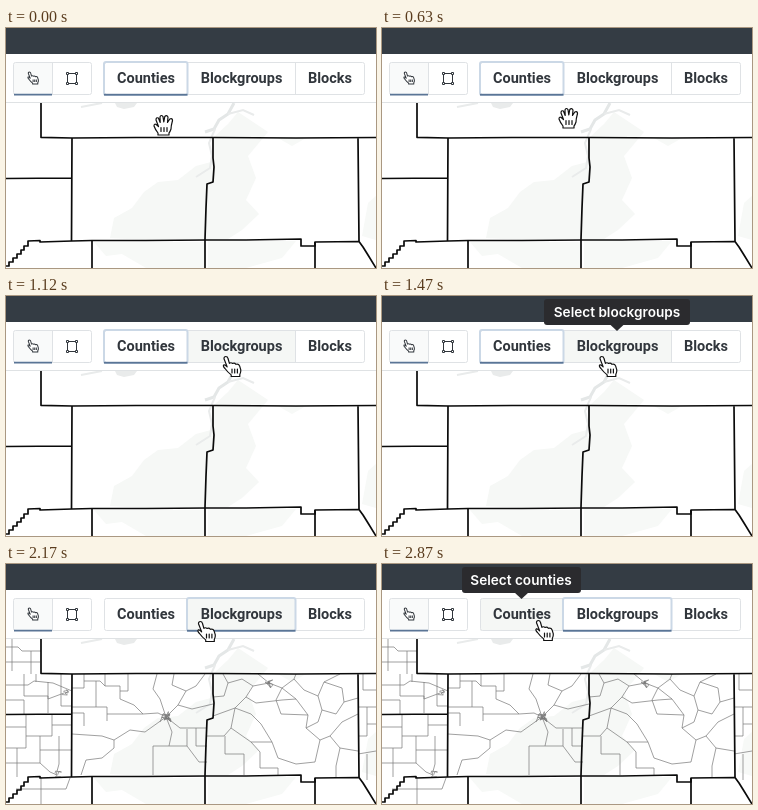
An HTML page for the animation above (2.94 s loop, 370 px wide and 240 px high).

```html
<!DOCTYPE html>
<html lang="en">
<head>
<meta charset="utf-8">
<style>
  html, body { margin: 0; width: 100%; height: 100%; overflow: hidden; background: #fff; }
  svg { display: block; width: 370px; height: 240px; }
  .label { font: 600 14.5px Roboto, sans-serif; fill: #31363c; text-anchor: middle; }
  .tip text { font: 600 13.6px Inter, sans-serif; fill: #fff; text-anchor: middle; }
  .tip { fill: #2b2b2e; }
  .frame { fill: none; stroke: #dfe2e5; }
  .county { fill: none; stroke: #0a0a0a; stroke-width: 1.7; stroke-linejoin: round; }
  .block { fill: none; stroke: #777; stroke-width: .7; stroke-linejoin: round; }
  .cursor { fill: #fff; stroke: #111; stroke-width: 1.2; stroke-linejoin: round; stroke-linecap: round; }
</style>
</head>
<body>
<svg viewBox="0 0 370 240">
  <defs>
    <g id="pointer">
      <path d="M-5 2.2Q-5 0 -3.2 0Q-1.4 0 -1 2L.4 6.8Q2 5.6 3.6 7Q5.4 6 7 7.8Q9.6 7 10.6 9.4L11.8 13.4Q12 16 10.8 18V20H2.2V18.4Q-1.5 15.5 -4 12Q-6.5 9.2 -5.2 8.4Q-4 7.8 -1.8 10.4Z"/>
      <path d="M3 12.5v4M5.7 12.5v4M8.4 12.5v4"/>
    </g>
    <g id="hand">
      <path d="M-6 10V8Q-9 4 -10 1Q-10 -1.5 -7.8 -.5L-5.5 1.5L-8 -5Q-8 -8 -5.6 -7L-3.8 -2.5L-4 -8Q-3 -10.8 -1 -8.3L-.2 -3L.8 -8.5Q2.6 -10.5 4 -8L3.5 -2.5L5.8 -6Q8.5 -7 8.5 -4.5Q7 1 7 4Q6 7 5 8V10Z"/>
      <path d="M-3 2.5v4M0 2.5v4M3 2.5v4"/>
    </g>
  </defs>

  <!-- terrain -->
  <path fill="#f6f8f6" d="M207 110L222 96L232 84L262 104L242 128L250 150L240 172L253 186L236 202L222 211L200 211L140 212L104 210L108 190L126 180L138 164L152 154L172 152L190 138L205 134Z"/>
  <path fill="#f7f9f7" d="M88 214H198V240H140L116 226L100 228ZM202 213H290L276 230L240 240H202ZM272 110L286 118L300 110ZM362 175L370 168V212L356 208Z"/>
  <path fill="#e9ebeb" d="M109 75H131L128 79L118 81L111 79Z"/>
  <path fill="none" stroke="#e4e7e7" stroke-width="3" stroke-linejoin="round" d="M228 75L222 86L213 92L208 101L199 104"/>
  <path fill="none" stroke="#e9ebeb" stroke-width="2" d="M209 101L203 115L206 128L204 140L190 149M222 86L237 82L248 87M75 79L96 75"/>

  <g id="blocks" class="block">
    <path d="M0 83H12L16 87H35M6 75V107M25 87V110M0 98H34M0 121H22L28 117L47 119L66 127M18 110V132H42V149M0 136H18V150M42 118V135L58 129M30 110V118M55 110V142H66"/>
    <path d="M0 163H20V151M20 163V184H0M20 172H46V151M46 161H66M34 172V199H0M34 186H66M53 172V200L50 211M11 184V213M34 199L44 208L51 211M10 225H60L64 214M35 213V240"/>
    <path d="M66 124H78V110M78 117H94L99 122V110M90 117V143H66M99 122H114V135L128 141L137 150L152 149L160 153M114 127H122V110M66 149H78V162M90 143H101V157M101 150L137 150M66 170L96 172L108 176L124 166L139 168L160 153M108 176V184L96 194L80 196L75 211"/>
    <path d="M160 153L154 135L147 125L151 110M160 153L172 141L180 127L190 122L199 110M172 141L186 145L207 140M180 127L166 121L168 110M160 153L174 164H201M160 153L166 168L163 182H147V211M163 182H181L193 198H201M181 182V165M190 164V182H201"/>
    <path d="M207 133L218 132L222 119L217 110M222 119L236 115L247 122L263 119L252 110M263 119L276 124L288 115L290 110M276 124L290 135L302 151L300 164L314 176L324 172L336 158L352 150M288 115L298 126L312 132L318 118L334 110M312 132L316 146L330 150L338 138L352 134M318 118L336 124L338 138"/>
    <path d="M247 122L240 133L229 144L245 150L255 160L266 178M207 152L229 144M240 133L250 139L276 136L290 135M276 124L270 136L275 150L302 151M229 144L225 164L218 172H201M225 164L245 178L266 178L272 194L290 200L309 198L314 176M219 172V190H238V211M245 178L254 188V204H272V211M324 172L334 184L352 187M334 184L330 202V213M316 146L312 158L300 164"/>
    <path d="M357 110V126H370M352 143H370M361 143V172H352M361 160H370M352 190L370 187M361 190V216"/>
  </g>

  <g class="county">
    <path d="M35 75V109.3L66 110L130 109.5L208 109.5L290 110L370 109.5M0 150.5L66 150M66 110L65.5 213M352 110L353 213"/>
    <path d="M207 109V130L208 139L207 154L201 156L200 180L199 211V240M86 212V240M309 214V240"/>
    <path d="M0 238H3V234H7V230H11V226H15V222H18V218H22V213L34 212.5V214L66 213L86 212.5L140 212.5L200 212L240 212L295 211V218H309V214L353 213.5L357 219L362 227L370 240"/>
  </g>

  <!-- toolbar -->
  <path fill="#fff" d="M0 26H370V74H0Z"/>
  <path fill="#dfe2e4" d="M0 74H370V75H0Z"/>
  <path fill="#343c44" d="M0 0H370V26H0Z"/>
  <path fill="#f9fafa" d="M8 35H46V67H8Z"/>
  <rect id="hover" y="35" height="32"/>
  <rect class="frame" x="7.5" y="34.5" width="78" height="32" rx="2"/>
  <rect class="frame" x="98.5" y="34.5" width="260" height="32" rx="2"/>
  <path class="frame" d="M46.5 35V66M181.5 35V66M289.5 35V66"/>
  <rect id="ring" y="34" height="33" rx="2" fill="none" stroke="#cbd8e6" stroke-width="2"/>
  <path fill="#5a7596" d="M8 65.8H46V67.5H8Z"/>
  <rect id="underline" y="65.8" height="1.8" fill="#5a7596"/>
  <use href="#pointer" transform="translate(25.3 44) scale(.6)" fill="#fff" stroke="#31363c" stroke-width="1.7" stroke-linejoin="round"/>
  <g fill="#fff" stroke="#31363c">
    <path d="M61.5 45.5H70.5V55.5H61.5Z"/>
    <path d="M60.5 44.5h2v2h-2zM69.5 44.5h2v2h-2zM60.5 54.5h2v2h-2zM69.5 54.5h2v2h-2z"/>
  </g>
  <g class="label">
    <text x="140" y="55">Counties</text>
    <text x="235.5" y="55">Blockgroups</text>
    <text x="324" y="55">Blocks</text>
  </g>

  <g id="countyTip" class="tip">
    <rect x="80" y="3" width="119" height="26" rx="3"/>
    <path d="M132 28H147L139.5 35Z"/>
    <text x="139" y="21">Select counties</text>
  </g>
  <g id="groupTip" class="tip">
    <rect x="162" y="3" width="146" height="26" rx="3"/>
    <path d="M227.5 28H242.5L235 35Z"/>
    <text x="235" y="21">Select blockgroups</text>
  </g>
  <use id="cursor" class="cursor"/>
</svg>
<script>
const el = id => document.getElementById(id);
const set = (id, attrs) => {
  for (const name in attrs) el(id).setAttribute(name, attrs[name]);
};
const LOOP = 2940, STEP = 70;
const counties = { x: 98, width: 83.5 }, groups = { x: 181, width: 108.5 };

// Cursor stops: time, x, y
const handPath = [[210, 158, 97], [420, 169, 95], [630, 187, 90], [770, 211, 80], [910, 218, 72]];
const pointerPath = [[980, 221, 64], [1120, 223, 60.5], [1960, 223, 60.5], [2170, 197.5, 57.5],
  [2450, 167.5, 57.5], [2590, 161, 57], [2730, 159.5, 56.5]];
const tipFade = [[1330, 0], [1470, 1], [1610, 0]];
const tipRise = [[2660, 0], [2800, 1]];

function along(stops, t) {
  const next = stops.findIndex(s => s[0] > t);
  if (next === 0) return stops[0].slice(1);
  if (next < 0) return stops.at(-1).slice(1);
  const a = stops[next - 1], b = stops[next], k = (t - a[0]) / (b[0] - a[0]);
  return a.slice(1).map((v, i) => v + (b[i + 1] - v) * k);
}

// Dense street tangles at the town centres
let seed = 7;
const random = () => (seed = seed * 16807 % 2147483647) / 2147483647;
function addTown(x, y, size, count) {
  const spot = () => `${x + (random() - .5) * size} ${y + (random() - .5) * size}`;
  const path = document.createElementNS('http://www.w3.org/2000/svg', 'path');
  path.setAttribute('d', 'M' + Array.from({ length: count }, spot).join('L'));
  el('blocks').append(path);
}
addTown(160, 153, 12, 18);
addTown(263, 120, 9, 13);
addTown(59, 128, 8, 11);
addTown(52, 210, 7, 8);

function draw(now) {
  const t = Math.floor(now % LOOP / STEP) * STEP;
  const isHand = t < 980;
  const [x, y] = along(isHand ? handPath : pointerPath, t);
  set('cursor', { href: isHand ? '#hand' : '#pointer', transform: `translate(${x} ${y})` });

  const pressed = t >= 1540 && t < 1890;
  set('hover', {
    ...(x < 182 ? counties : groups),
    fill: isHand ? 'none' : pressed ? '#e0e3e3' : '#f5f7f5'
  });
  const focused = t < 1540 ? counties : groups;
  set('ring', focused);
  set('underline', t < 1820 ? counties : groups);
  set('blocks', { opacity: t < 1890 ? 0 : 1 });
  set('groupTip', { opacity: along(tipFade, t)[0] });
  set('countyTip', { opacity: along(tipRise, t)[0] });
}

const start = performance.now();
function loop() {
  draw(performance.now() - start);
  requestAnimationFrame(loop);
}
loop();
</script>
</body>
</html>
```
